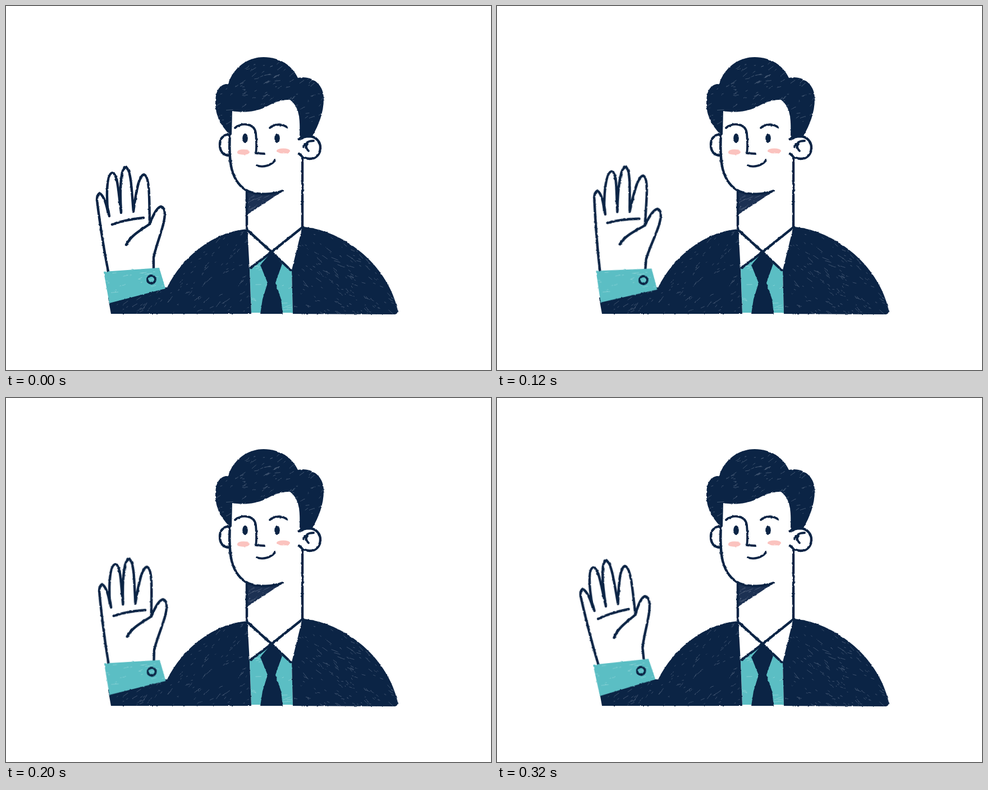
Animation of 864 by 648 pixels, one loop 360 ms. Source, as an HTML page:

```html
<!DOCTYPE html>
<html lang="en">
<head>
<meta charset="utf-8">
<title>Waving man</title>
<style>
  html, body { margin: 0; width: 100%; height: 100%; overflow: hidden; background: #fff; }
  svg { display: block; width: 864px; height: 648px; }
  .ink { fill: #0b2445; }
  .shade { fill: #1c3153; }
  .teal { fill: #5bbec4; }
  .paper { fill: #fff; }
  .blush { fill: #fbc3bf; }
  .line { fill: none; stroke: #0b2445; stroke-width: 4.4; stroke-linecap: round; stroke-linejoin: round; }
  .fine { stroke-width: 3.8; }
  .paper.line { fill: #fff; }
  .grain { fill: none; stroke-width: 1; stroke-linecap: round; opacity: 0.45; }
</style>
</head>
<body>
<svg viewBox="0 0 864 648" xmlns="http://www.w3.org/2000/svg">
  <defs>
    <!-- The noise is made opaque so that the displacement averages to zero. -->
    <filter id="rough" filterUnits="userSpaceOnUse" x="100" y="60" width="640" height="520" color-interpolation-filters="sRGB">
      <feTurbulence type="fractalNoise" baseFrequency="0.17" numOctaves="2" seed="4"/>
      <feColorMatrix values="1 0 0 0 0  0 1 0 0 0  0 0 1 0 0  0 0 0 0 1" result="noise"/>
      <feDisplacementMap in="SourceGraphic" in2="noise" scale="2.6" xChannelSelector="R" yChannelSelector="G"/>
    </filter>
    <path id="hair" d="M399 229C386 217 373 197 373 174C373 150 380 140 396 138C405 110 430 91 459 91C488 91 510 106 520 128C545 123 566 139 566 165C566 190 557 212 546 231L523 234C524 204 524 181 506 167C490 166 475 173 462 180C444 189 422 190 403 187L402 229Z"/>
    <path id="leftCoat" d="M430 397C370 402 315 445 287 501L272 500L182 520L187 548L437 548L434 470Z"/>
    <path id="rightCoat" d="M528 393C595 398 678 455 698 542Q698 549 692 549L511 548L509 470Z"/>
    <path id="shirt" d="M473 438L434 467L437 546L511 546L509 471Z"/>
    <path id="cuff" d="M174 473L273 466L284 503L184 529Z"/>
    <path id="chinShade" d="M429 330C448 338 475 336 497 327L429 372Z"/>
    <clipPath id="hairClip"><use href="#hair"/></clipPath>
    <clipPath id="leftCoatClip"><use href="#leftCoat"/></clipPath>
    <clipPath id="rightCoatClip"><use href="#rightCoat"/></clipPath>
    <clipPath id="shirtClip"><use href="#shirt"/></clipPath>
    <clipPath id="cuffClip"><use href="#cuff"/></clipPath>
    <clipPath id="chinShadeClip"><use href="#chinShade"/></clipPath>
  </defs>

  <g id="hand"><g filter="url(#rough)">
    <path class="paper line" d="M184 482C177 448 169 400 162 346C162 336 166 331 170 336C176 343 180 358 182 370C179 345 178 300 189 297C200 298 200 335 205 366C203 335 203 289 213 287C223 289 224 330 227 366C231 335 236 301 246 300C257 304 255 350 256 388C262 372 270 358 276 357C284 359 284 371 281 385C276 407 266 430 263 448L263 480"/>
    <path class="line" d="M182 362L184 374M205 360L205 368M189 389C207 382 225 379 245 377M214 425C224 407 239 400 256 388"/>
  </g></g>

  <g filter="url(#rough)">
    <path class="paper" d="M429 320H528V394L473 438L430 398Z"/>
    <path class="paper" d="M430 398L473 438L434 468ZM528 394L473 438L509 471Z"/>
    <use href="#shirt" class="teal"/>
    <g class="grain" data-clip="shirtClip" data-box="434 440 78 108" data-tilt="-4" data-count="26" data-ink="#b9e5e6"/>
    <path class="ink" d="M473 438L492 459L480 493L490 522L493 548H453L457 522L466 493L453 461Z"/>
    <use href="#leftCoat" class="ink"/>
    <g class="grain" data-clip="leftCoatClip" data-box="185 400 250 148" data-tilt="-38" data-count="180" data-ink="#7c8ba0"/>
    <use href="#rightCoat" class="ink"/>
    <g class="grain" data-clip="rightCoatClip" data-box="511 398 187 148" data-tilt="34" data-count="180" data-ink="#7c8ba0"/>
    <use href="#chinShade" class="shade"/>
    <g class="grain" data-clip="chinShadeClip" data-box="429 330 66 40" data-tilt="-32" data-count="40" data-ink="#7c8ba0"/>
    <path class="line" d="M429 331V398L473 438L507 470M528 270V394L473 438L436 466"/>

    <path class="paper line" d="M399 229C387 228 381 236 381 247C381 259 387 266 398 266"/>
    <path class="paper" d="M400 180H526V330H497C475 336 448 338 430 329C410 316 398 295 398 265Z"/>
    <path class="line" d="M399 226C398 245 397 268 402 290C407 309 417 323 432 330C450 337 475 336 493 329"/>
    <use href="#hair" class="ink"/>
    <g class="grain" data-clip="hairClip" data-box="373 92 193 136" data-tilt="-24" data-count="170" data-ink="#8190a5"/>
    <path class="paper line" d="M522 237C528 233 534 232 541 232C553 233 560 242 560 252C560 264 552 272 541 272C533 272 527 268 522 263"/>
    <path class="line fine" d="M530 251C533 244 539 240 548 240M537 246C533 249 535 254 539 258"/>

    <ellipse class="blush" cx="423" cy="260" rx="11" ry="4.8"/>
    <ellipse class="blush" cx="494" cy="258" rx="12" ry="4.6"/>
    <ellipse class="ink" cx="426" cy="235.5" rx="4.8" ry="8.5"/>
    <ellipse class="ink" cx="483" cy="235.5" rx="4.8" ry="8.5"/>
    <path class="line fine" d="M408 217C419 208 442 207 445 226C446 238 447 252 445 262L461 263M470 217C478 209 493 210 501 216M447 284C458 288 472 284 479 275"/>
  </g>

  <g id="wrist"><g filter="url(#rough)">
    <use href="#cuff" class="teal"/>
    <g class="grain" data-clip="cuffClip" data-box="174 468 110 60" data-tilt="-10" data-count="26" data-ink="#b9e5e6"/>
    <circle class="line fine" cx="259" cy="487" r="7"/>
  </g></g>
</svg>
<script>
  const STEP = 40;
  const SWING = [0, 0.34, 0.62, 0.82, 0.92, 0.3, -0.74, -1.02, -1];
  const hand = document.getElementById('hand');
  const wrist = document.getElementById('wrist');

  function seeded(seed) {
    return () => (seed = (seed * 16807) % 2147483647) / 2147483647;
  }

  // Fine chalk streaks, thinly scattered inside a shape.
  function addGrain(group, index) {
    const { clip, box, tilt, count, ink } = group.dataset;
    const [x, y, w, h] = box.split(' ').map(Number);
    const random = seeded(917 + index * 7331);
    let d = '';
    for (let i = 0; i < count; i++) {
      const angle = (Number(tilt) + (random() - 0.5) * 40) * Math.PI / 180;
      const length = 2 + random() ** 2 * 12;
      const dx = Math.cos(angle) * length, dy = Math.sin(angle) * length;
      d += `M${(x + random() * w).toFixed(1)} ${(y + random() * h).toFixed(1)}l${dx.toFixed(1)} ${dy.toFixed(1)}`;
    }
    const path = document.createElementNS('http://www.w3.org/2000/svg', 'path');
    path.setAttribute('d', d);
    group.setAttribute('clip-path', `url(#${clip})`);
    group.setAttribute('stroke', ink);
    group.append(path);
  }

  function draw(time) {
    const swing = SWING[Math.floor(time / STEP) % SWING.length];
    hand.setAttribute('transform', `rotate(${swing * 5.6} 228 483)`);
    wrist.setAttribute('transform', `rotate(${swing * 2.1} 226 550)`);
  }

  document.querySelectorAll('.grain').forEach(addGrain);
  const start = performance.now();
  function tick() {
    draw(performance.now() - start);
    requestAnimationFrame(tick);
  }
  tick();
</script>
</body>
</html>
```
